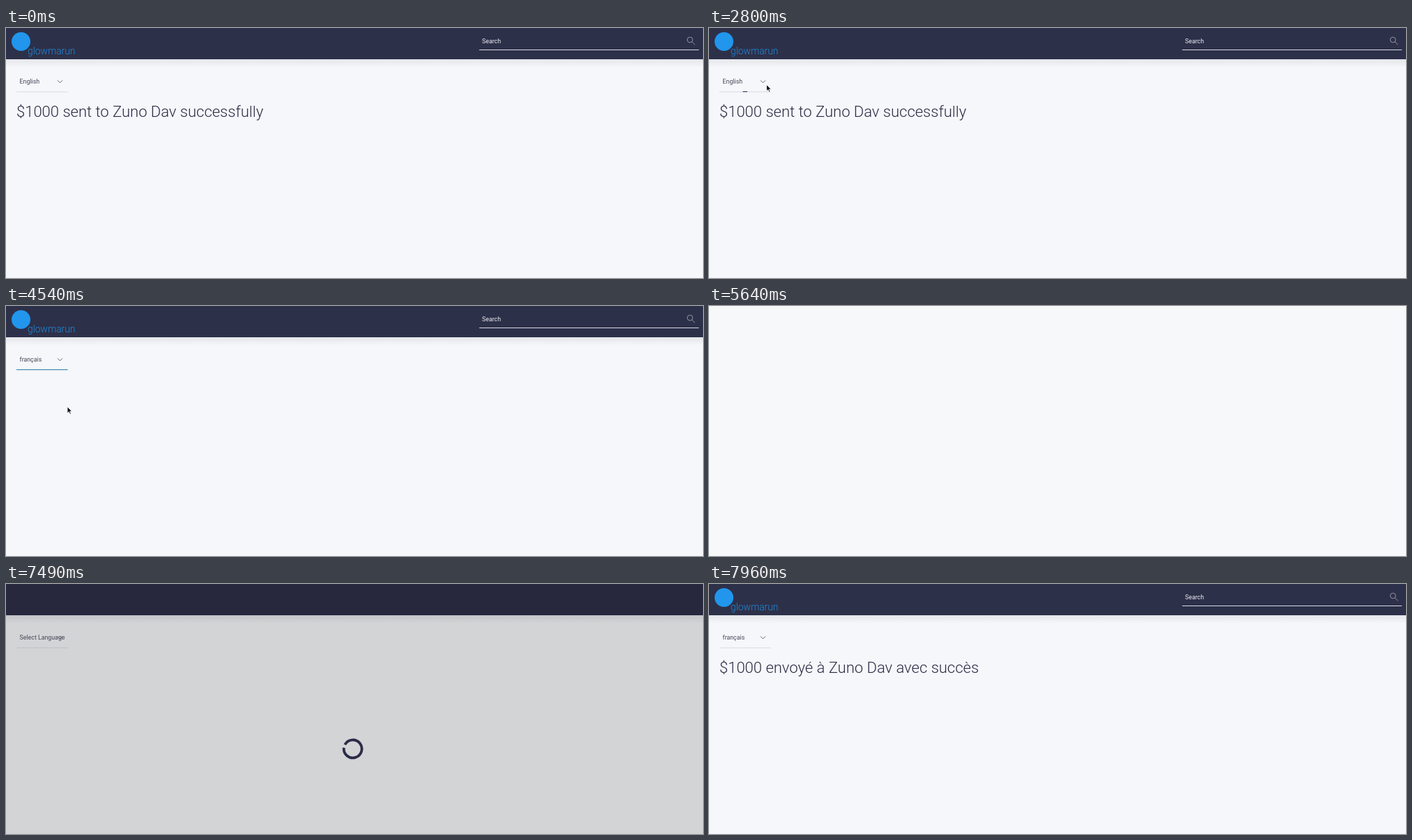
An HTML page that plays this animation: 1000 px wide and 360 px high, repeating every 8000 ms.

```html
<!DOCTYPE html>
<html lang="en">
<head>
<meta charset="utf-8">
<title>Language switch</title>
<style>
  html, body { margin: 0; width: 100%; height: 100%; overflow: hidden; background: #f6f8fa; }
  svg { display: block; width: 1000px; height: 360px; font-family: Roboto, Inter, sans-serif; }
  .small { font-size: 8.8px; }
  .light { font-weight: 300; }
  .stroke { fill: none; stroke-width: 1; }
</style>
</head>
<body>
<svg viewBox="0 0 1000 360">
  <defs>
    <linearGradient id="fade" x2="0" y2="1">
      <stop stop-color="#2d3049" stop-opacity=".09"/>
      <stop offset="1" stop-color="#2d3049" stop-opacity="0"/>
    </linearGradient>
  </defs>
  <rect id="back" width="1000" height="360"/>

  <g id="page">
    <rect y="45" width="1000" height="12" fill="url(#fade)"/>
    <rect id="bar" width="1000" height="45"/>
    <g id="tools">
      <circle cx="21.5" cy="19.5" r="13.5" fill="#2196ec"/>
      <text class="light" x="31" y="38" font-size="13.8" fill="#2089da">glowmarun</text>
      <text class="small" x="683" y="22" fill="#eeeff4">Search</text>
      <path class="stroke" d="M679 31.5H994" stroke="#d9dae2"/>
      <g class="stroke" stroke="#9496a3">
        <circle cx="981.3" cy="17" r="3.9"/>
        <path d="M984.2 19.9L988.5 24.2"/>
      </g>
    </g>
    <rect id="base" x="15" y="91.2" width="73.5" height="1.4"/>
    <rect id="focus" y="91" height="1.2"/>
    <text id="lang" class="small" x="19.6" y="80.3" fill="#454758"></text>
    <path class="stroke" d="M74 75.4L77.5 78.9L81 75.4" stroke="#62646f"/>
    <text id="note" class="light" x="15" y="128.2" font-size="22" fill="#2b2d45"></text>
  </g>

  <g id="spinner" fill="none" stroke="#2b2d47" stroke-width="3.8">
    <path id="ring"/>
  </g>

  <path id="pointer" d="M0 0V9.4L2.2 7.4L3.8 10.8L5.3 10.1L3.8 6.8H6.6Z"
        fill="#111" stroke="#fff" stroke-width=".8" stroke-linejoin="round"/>
</svg>
<script>
const LOOP = 8000;
const T = { focus: 2780, pick: 4280, blank: 5640, load: 6760, shell: 7490, clear: 7570, ready: 7940 };
const PERSON = "Zuno Dav";
const CENTER = { x: 497.6, y: 237.4, r: 12.9 };
const SPIN_MS = 915;

// time, x, y of the pointer tip
const PATH = [
  [1620, 270, 236],
  [2530, 110, 140],
  [2780, 82.5, 81.5],
  [3380, 82.5, 81.5],
  [4180, 88, 145],
  [5640, 88, 145]
];

const el = id => document.getElementById(id);
const set = (id, attrs) => {
  for (const k in attrs) el(id).setAttribute(k, attrs[k]);
};
const show = (id, on) => set(id, { visibility: on ? "inherit" : "hidden" });
const write = (id, text) => {
  if (el(id).textContent !== text) el(id).textContent = text;
};
const ease = u => u * u * (3 - 2 * u);

function arc({ r }, gap) {
  const a = gap / 2 * Math.PI / 180;
  const x = r * Math.sin(a), y = -r * Math.cos(a);
  return `M${x} ${y}A${r} ${r} 0 1 1 ${-x} ${y}`;
}

function pointerAt(t) {
  const i = PATH.findIndex(p => p[0] > t);
  if (i < 1) return null;
  const [t0, x0, y0] = PATH[i - 1], [t1, x1, y1] = PATH[i];
  const u = ease((t - t0) / (t1 - t0));
  return [x0 + (x1 - x0) * u, y0 + (y1 - y0) * u];
}

function label(t) {
  if (t < T.pick) return "English";
  return t < T.ready ? (t < T.blank ? "français" : "Select Language") : "français";
}

function message(t) {
  if (t < T.pick) return `$1000 sent to ${PERSON} successfully`;
  return t < T.ready ? "" : `$1000 envoyé à ${PERSON} avec succès`;
}

function draw(t) {
  const dim = t >= T.load && t < T.clear;
  const shell = t >= T.shell && t < T.ready;
  set("back", { fill: dim ? "#d2d4d6" : t >= T.blank && t < T.load ? "#f7f8fa" : "#f5f7fa" });
  show("page", t < T.blank || t >= T.shell);
  show("tools", !shell);
  set("bar", { fill: shell ? "#27283e" : "#2d3049" });
  set("base", { fill: dim ? "#c4c5c9" : "#e3e4e8" });
  write("lang", label(t));
  write("note", message(t));

  // the underline grows from its middle
  const grow = t < T.blank ? Math.min(1, Math.max(0, (t - T.focus) / 240)) : 0;
  const width = 73.5 * grow;
  set("focus", { x: 51.75 - width / 2, width, fill: grow < 1 ? "#41465f" : "#4692b5" });

  show("spinner", dim);
  const turn = (t - T.load) / SPIN_MS * 360;
  set("spinner", { transform: `translate(${CENTER.x} ${CENTER.y}) rotate(${turn})` });

  const tip = pointerAt(t);
  show("pointer", !!tip);
  if (tip) set("pointer", { transform: `translate(${tip})` });
}

set("ring", { d: arc(CENTER, 21) });
const start = performance.now();
function tick() {
  draw((performance.now() - start) % LOOP);
  requestAnimationFrame(tick);
}
tick();
</script>
</body>
</html>
```
